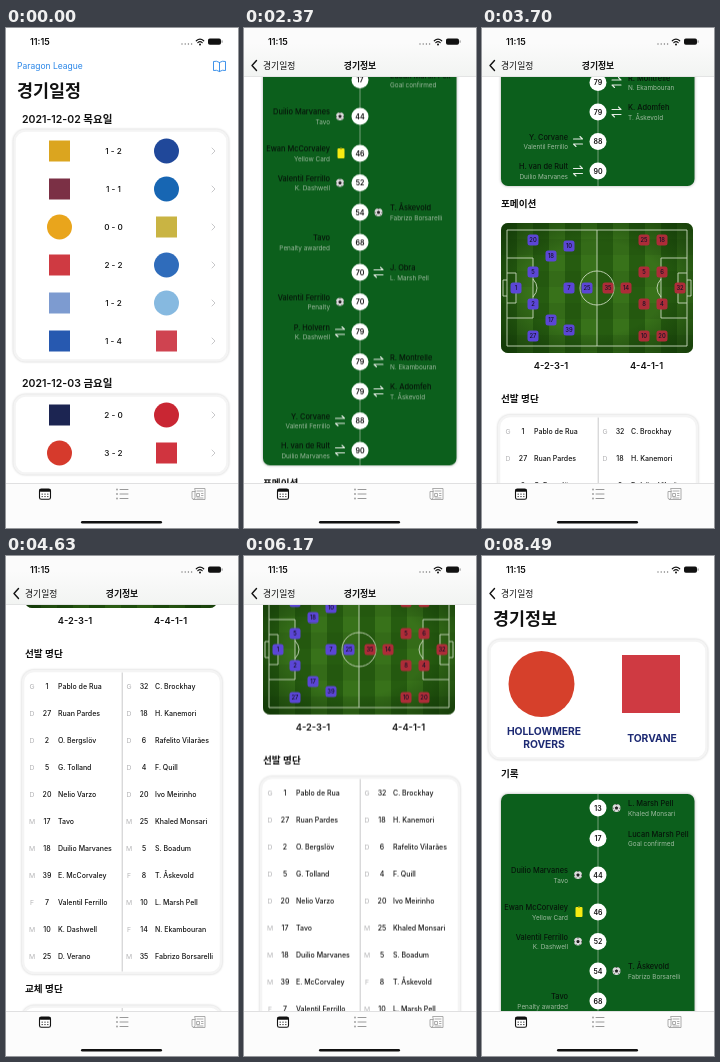
Recreate the animation shown at these times as an HTML page. Size 232 px wide and 500 px high, loop 8.54 s.

```html
<!DOCTYPE html>
<html lang="ko">
<head>
<meta charset="utf-8">
<title>경기일정</title>
<style>
  html, body { margin: 0; width: 232px; height: 500px; overflow: hidden; background: #fff; }
  svg { display: block; }
  text { font-family: Inter, 'Noto Sans CJK KR', 'Noto Sans CJK', sans-serif; }
  .card { fill: #fff; stroke: #f4f4f4; stroke-width: 2.5; filter: drop-shadow(0 0 1px #0003); }
  .line { fill: none; stroke-linecap: round; stroke-linejoin: round; }

  #list, #dim, #press, #detail, #scroll, #bar { animation: 8540ms linear infinite; }
  #list { animation-name: list; }
  #dim { animation-name: dim; }
  #press { animation-name: press; }
  #detail { animation-name: push; }
  #scroll { animation-name: scroll; }
  #bar { animation-name: bar; }

  @keyframes press { 0%, 8.2% { opacity: 0 } 9%, 100% { opacity: 1 } }
  @keyframes list {
    0%, 9.95% { transform: translateX(0); animation-timing-function: cubic-bezier(.2, .75, .2, 1) }
    19.6%, 100% { transform: translateX(-70px) }
  }
  @keyframes dim {
    0%, 9.95% { opacity: 0; animation-timing-function: cubic-bezier(.2, .75, .2, 1) }
    19.6%, 100% { opacity: .1 }
  }
  @keyframes push {
    0%, 9.95% { transform: translateX(236px); animation-timing-function: cubic-bezier(.2, .75, .2, 1) }
    19.6%, 100% { transform: translateX(0) }
  }
  @keyframes scroll {
    0%, 24.82% { transform: translateY(0); animation-timing-function: cubic-bezier(.4, .2, .75, .8) }
    27.75% { transform: translateY(-230px); animation-timing-function: cubic-bezier(.15, .6, .4, 1) }
    35.2% { transform: translateY(-318px); animation-timing-function: cubic-bezier(.3, .3, .4, .95) }
    43.33% { transform: translateY(-510px) }
    45.2% { transform: translateY(-521px); animation-timing-function: cubic-bezier(.25, .4, .4, 1) }
    54.2% { transform: translateY(-783px) }
    55.4% { transform: translateY(-784px); animation-timing-function: cubic-bezier(.25, .4, .4, 1) }
    63% { transform: translateY(-1036px) }
    65.8% { transform: translateY(-1043px); animation-timing-function: cubic-bezier(.3, .3, .5, .9) }
    72.25% { transform: translateY(-677px); animation-timing-function: cubic-bezier(.2, .5, .5, 1) }
    76.4% { transform: translateY(-590px); animation-timing-function: cubic-bezier(.25, .4, .4, 1) }
    83% { transform: translateY(-229px) }
    86.8% { transform: translateY(-222px); animation-timing-function: cubic-bezier(.25, .4, .4, 1) }
    96.5% { transform: translateY(-3px) }
    99.4%, 100% { transform: translateY(0) }
  }
  @keyframes bar {
    0%, 25.3% { opacity: 0 }
    26.2%, 91% { opacity: 1 }
    92.5%, 100% { opacity: 0 }
  }
</style>
</head>
<body>
<svg id="stage" width="232" height="500" viewBox="0 0 232 500"></svg>
<script>
// Text centred vertically on y
const text = (x, y, s, size, { w = 400, fill = '#111', a = 'start' } = {}) =>
  `<text x="${x}" y="${(y + size * .36).toFixed(2)}" font-size="${size}" font-weight="${w}" fill="${fill}" text-anchor="${a}">${s}</text>`;
const rect = (x, y, w, h, fill, rx = 0, more = '') =>
  `<rect x="${x}" y="${y}" width="${w}" height="${h}" rx="${rx}" fill="${fill}" ${more}/>`;
const circle = (x, y, r, fill) => `<circle cx="${x}" cy="${y}" r="${r}" fill="${fill}"/>`;
const line = (d, stroke, w = 1) => `<path class="line" d="${d}" stroke="${stroke}" stroke-width="${w}"/>`;
const card = (x, y, w, h) => `<rect class="card" x="${x + 1.5}" y="${y + 1.5}" width="${w - 3}" height="${h - 3}" rx="11"/>`;
const mid = { a: 'middle' };

// Match list: score, then the shape and colour of both badges
const matches = [
  ['1 - 2', 's#dba51f', 'c#20489a'], ['1 - 1', 's#7b3045', 'c#1766b3'],
  ['0 - 0', 'c#e9a51c', 's#c9b443'], ['2 - 2', 's#cf3a42', 'c#2f6cbb'],
  ['1 - 2', 's#7d9bd0', 'c#86b9e0'], ['1 - 4', 's#2759b0', 's#cf4350'],
  ['2 - 0', 's#1c2552', 'c#c92633'], ['3 - 2', 'c#d63a2c', 's#d0343f']
];
const badge = (x, y, code, size) => {
  const fill = code.slice(1), r = size / 2;
  return code[0] === 'c' ? circle(x, y, r, fill) : rect(x - r, y - r, size, size, fill);
};
const matchRow = ([score, home, away], i) => {
  const y = i < 6 ? 123 + 38 * i : 387 + 38 * (i - 6);
  const size = c => c[0] === 'c' ? 25 : 21;
  return badge(53.5, y, home, size(home)) + badge(160.5, y, away, size(away)) +
    text(107.5, y, score, 8.2, { ...mid, w: 500 }) +
    line(`M206 ${y - 3}l3 3l-3 3`, '#c8c8ca', 1);
};
const dateHead = (y, s) => text(16, y, s, 10.5, { w: 600 });
const book = line('M213.5 43.500q-3-2-6-1v-9q3-1 6 1q3-2 6-1v9q-3-1-6 1v-9', '#2b87e8', .9);

const list = rect(0, 0, 232, 456, '#fff') +
  text(11, 37.5, 'Paragon League', 8.5, { fill: '#2b87e8' }) + book +
  text(11, 62.3, '경기일정', 17.4, { w: 700 }) +
  dateHead(91, '2021-12-02 목요일') + card(7, 101, 216, 233) +
  dateHead(355, '2021-12-03 금요일') + card(7, 366, 216, 81) +
  rect(10, 406, 210, 38, '#dcdcdf', 8, 'id="press"') +
  matches.map(matchRow).join('');

// Match timeline: y, minute, side, icon, name, note
const events = [
  [252, 13, 'R', 'ball', 'L. Marsh Pell', 'Khaled Monsari'],
  [282.5, 17, 'R', '', 'Lucan Marsh Pell', 'Goal confirmed'],
  [319, 44, 'L', 'ball', 'Duilio Marvanes', 'Tavo'],
  [356, 46, 'L', 'yellow', 'Ewan McCorvaley', 'Yellow Card'],
  [385.5, 52, 'L', 'ball', 'Valentil Ferrillo', 'K. Dashwell'],
  [415, 54, 'R', 'ball', 'T. Åskevold', 'Fabrizo Borsarelli'],
  [445, 68, 'L', '', 'Tavo', 'Penalty awarded'],
  [475, 70, 'R', 'swap', 'J. Obra', 'L. Marsh Pell'],
  [504.5, 70, 'L', 'ball', 'Valentil Ferrillo', 'Penalty'],
  [534.5, 79, 'L', 'swap', 'P. Holvern', 'K. Dashwell'],
  [564.5, 79, 'R', 'swap', 'R. Montrelle', 'N. Ekambouran'],
  [594, 79, 'R', 'swap', 'K. Adomfeh', 'T. Åskevold'],
  [623.5, 88, 'L', 'swap', 'Y. Corvane', 'Valentil Ferrillo'],
  [653, 90, 'L', 'swap', 'H. van de Rult', 'Duilio Marvanes']
];
const icons = {
  '': () => '',
  ball: (x, y) => circle(x, y, 4, '#dcdcdc') +
    `<path transform="translate(${x} ${y})" fill="#222" d="M0-1.700L1.700-.4L1 1.500H-1L-1.700-.4ZM-1.500-3.700H1.500L0-2.900ZM3.800-1L3.600 1.500L2.900.3ZM-3.800-1L-3.600 1.500L-2.900.3ZM1.400 3.600L2.800 2.600L1.600 2.400ZM-1.400 3.600L-2.800 2.600L-1.600 2.400Z"/>`,
  yellow: (x, y) => rect(x - 2.5, y - 5, 7, 10, '#f7ea12', 1) + rect(x, y - 5.5, 2, 1.5, '#b8ad10'),
  swap: (x, y) => line(`M${x - 4.5} ${y - 2.5}h9l-2.500-2.500M${x + 4.5} ${y + 2.5}h-9l2.500 2.500`, '#e4ece4', 1.1)
};
const eventRow = ([y, minute, side, icon, name, note]) => {
  const left = side === 'L', x = left ? 86 : 146, a = left ? 'end' : 'start';
  return circle(116, y, 8.5, '#fff') + text(116, y, minute, 7, { ...mid, w: 600 }) +
    icons[icon](left ? 96 : 134.5, y) +
    text(x, y - 4.5, name, 7.4, { a, w: 500, fill: '#06140a' }) +
    text(x, y + 5.2, note, 6.4, { a, fill: '#9dba9f' });
};

// Pitch; players given as number,x,y
const blues = '1,34,260 20,51,212 5,51,244 2,51,276 27,51,308 18,69,228 17,69,292 10,87,218 7,87,260 39,87,302 25,105,260';
const reds = '32,198,260 18,180,212 6,180,244 4,180,276 20,180,308 25,162,212 5,162,244 8,162,276 10,162,308 14,144,260 35,126,260';
const team = (players, fill) => players.split(' ').map(p => {
  const [n, x, y] = p.split(',').map(Number);
  return rect(x - 5.5, y - 5.5, 11, 11, fill, 2.5) + text(x, y, n, 5.8, { ...mid, w: 500, fill: '#161228' });
}).join('');
const stripes = Array.from({ length: 12 }, (_, i) => rect(19 + 16 * i, 195, 16, 130, i % 2 ? '#38721a' : '#265c10')).join('') +
  Array.from({ length: 4 }, (_, i) => rect(19, 211 + 32 * i, 192, 16, '#183f08', 0, 'opacity=".12"')).join('');
const marks = `<g fill="none" stroke="#c9d8bd" stroke-width=".9">
  <path d="M25 202H205V318H25ZM115 202V318M25 230H51V290H25M25 245H34V275H25M205 230H179V290H205M205 245H196V275H205M25 252H21V268H25M205 252H209V268H205M51 251q8 9 0 18M179 251q-8 9 0 18"/>
  <circle cx="115" cy="260" r="17"/></g>`;
const pitch = `<g transform="translate(0 510)"><g clip-path="url(#pitchClip)">${stripes}${rect(19, 195, 192, 130, 'url(#shade)')}${marks}</g>
  ${team(blues, '#5b46d6')}${team(reds, '#ad2c38')}</g>`;

// Squads, one player per entry: position, number, name
const homeXI = 'G 1 Pablo de Rua|D 27 Ruan Pardes|D 2 O. Bergslöv|D 5 G. Tolland|D 20 Nelio Varzo|M 17 Tavo|M 18 Duilio Marvanes|M 39 E. McCorvaley|F 7 Valentil Ferrillo|M 10 K. Dashwell|M 25 D. Verano';
const awayXI = 'G 32 C. Brockhay|D 18 H. Kanemori|D 6 Rafelito Vilarães|D 4 F. Quill|D 20 Ivo Meirinho|M 25 Khaled Monsari|M 5 S. Boadum|F 8 T. Åskevold|M 10 L. Marsh Pell|F 14 N. Ekambouran|M 35 Fabrizo Borsarelli';
const homeSubs = 'G 26 B. Harwick|D 3 C. Lorvain|D 23 S. Penhale|D 29 A. Wolbury|M 14 P. Holvern|M 31 N. Dravic|M 34 H. van de Rult|F 9 Y. Corvane|F 36 E. Lindar';
const awaySubs = 'G 1 M. Strohl|D 3 K. Tarney|D 16 R. Holdane|D 21 C. Chanler|M 23 S. Lokame|M 7 J. Obra|F 9 R. Montrelle|F 30 K. Adomfeh|F 19 N. Pelier';
const column = (squad, top, [px, nx, tx]) => squad.split('|').map((entry, i) => {
  const [pos, no, ...name] = entry.split(' '), y = top + 17 + 27 * i;
  return text(px, y, pos, 6.8, { ...mid, fill: '#b4b4b6' }) +
    text(nx, y, no, 7, { ...mid, w: 500 }) + text(tx, y, name.join(' '), 7, { w: 500 });
}).join('');
const squads = (top, rows, home, away) => card(15.5, top, 201, 27 * rows + 8) +
  rect(115.7, top + 3, 1, 27 * rows + 2, '#c9c9cb') +
  column(home, top, [26, 41, 52]) + column(away, top, [123, 138, 149]);

const head = (y, s) => text(19, y, s, 9.6, { w: 600 });
const club = (x, y, s) => text(x, y, s, 10.3, { ...mid, w: 700, fill: '#1d2a73' });
const formation = (x, s) => text(x, 848, s, 9.3, { ...mid, w: 600 });

const content = text(11, 62.3, '경기정보', 17.4, { w: 700 }) +
  card(6, 83, 220, 121) + badge(59.5, 128, 'c#d6402b', 66) + badge(169, 128, 's#cf3a42', 58) +
  club(62, 175.5, 'HOLLOWMERE') + club(62, 188, 'ROVERS') + club(170, 182, 'TORVANE') +
  head(218, '기록') +
  rect(19, 238, 193.5, 430, '#0c5f1c', 7, 'style="filter:drop-shadow(0 0 1.500px #0005)"') +
  rect(115.6, 238, .8, 430, '#8fae92') + events.map(eventRow).join('') +
  head(686, '포메이션') + pitch + formation(69, '4-2-3-1') + formation(164.5, '4-4-1-1') +
  head(880.5, '선발 명단') + squads(896.5, 11, homeXI, awayXI) +
  head(1216, '교체 명단') + squads(1232, 9, homeSubs, awaySubs);

const detail = rect(0, 0, 232, 456, '#fff') +
  `<g clip-path="url(#view)"><g id="scroll">${content}</g></g>` +
  `<g id="bar">${rect(0, 0, 232, 49, 'url(#frost)')}${rect(0, 48.5, 232, .5, '#d2d2d4')}${text(116, 37.5, '경기정보', 8.8, { ...mid, w: 700 })}</g>` +
  line('M12.500 32.500l-4.500 5l4.500 5', '#111', 1.4) + text(19, 37.5, '경기일정', 8.8);

const status = text(24, 13.8, '11:15', 9, { w: 600 }) +
  [176, 179.2, 182.4, 185.6].map(x => circle(x, 16, .7, '#777')).join('') +
  line('M190.300 12.800q3.700-3.200 7.400 0M191.800 14.600q2.200-1.900 4.400 0', '#111', 1.2) + circle(194, 16.4, 1, '#111') +
  rect(202, 10.5, 13, 6.2, '#111', 1.8) + rect(215.6, 12.3, .9, 2.5, '#777', .4);

const calendar = rect(33.5, 461, 11, 10.3, '#fff', 1.8, 'stroke="#111" stroke-width="1.100"') + rect(33.5, 461, 11, 2.8, '#111', 1) +
  [0, 1, 2, 3, 4, 5].map(i => rect(35.6 + i % 3 * 2.8, 465.6 + (i / 3 | 0) * 2.4, 1.2, 1.1, '#333')).join('');
const bullets = [461.5, 466, 470.5].map(y => circle(111, y, .9, '#999') + line(`M114 ${y}h8`, '#999', 1)).join('');
const paper = line('M189 460.500h10v11h-11q-2 0-2-2v-6h3zM189 463.500v6q0 2-1.500 2M191 463h6M191 465.500h2.500v3h-2.500zM195.500 465.500h1.500M195.500 467.500h1.500M191 470h6', '#999', .8);
const tabs = rect(0, 455, 232, 45, '#fcfcfc') + rect(0, 455, 232, .6, '#cfcfd1') + calendar + bullets + paper +
  rect(75, 493, 81, 2.6, '#111', 1.3);

document.getElementById('stage').innerHTML = `<defs>
  <clipPath id="view"><rect y="48" width="232" height="408"/></clipPath>
  <clipPath id="pitchClip"><rect x="19" y="195" width="192" height="130" rx="7"/></clipPath>
  <radialGradient id="shade" r=".7"><stop offset=".5" stop-color="#0a2a04" stop-opacity="0"/><stop offset="1" stop-color="#0a2a04" stop-opacity=".7"/></radialGradient>
  <linearGradient id="frost" x2="0" y2="1"><stop offset=".3" stop-color="#fbfbfb"/><stop offset="1" stop-color="#f2f4f2"/></linearGradient>
  </defs><rect width="232" height="500" fill="#fff"/>
  <g id="list">${list}</g><rect id="dim" width="232" height="456"/>
  <g id="detail">${detail}</g>${status}${tabs}`;
</script>
</body>
</html>
```
